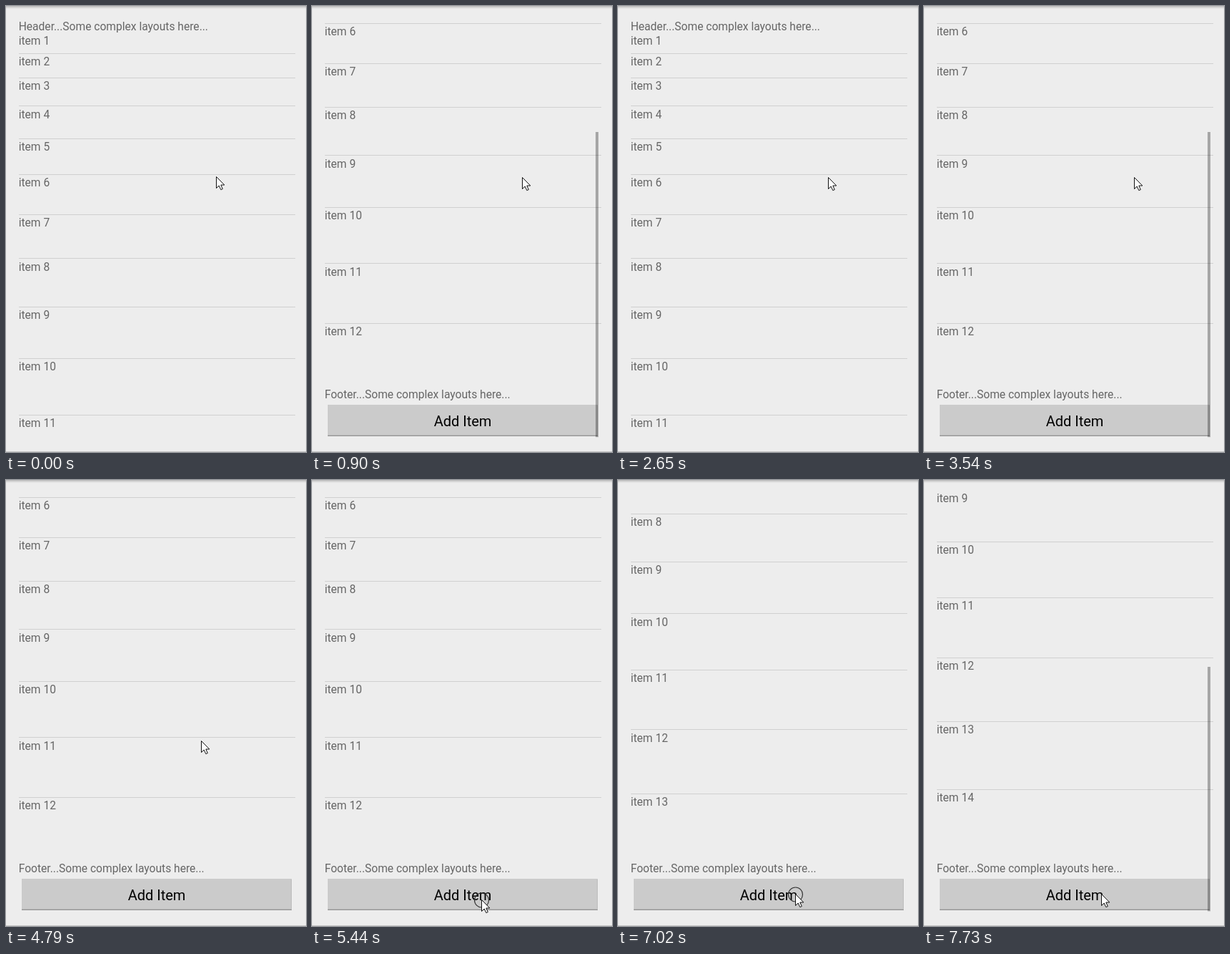
An HTML page with a canvas that plays this animation: 420x623 px, repeating every 8000 ms.

```html
<!DOCTYPE html>
<html lang="en">
<head>
<meta charset="utf-8">
<title>List with header and footer</title>
<style>
  html, body { margin: 0; height: 100%; overflow: hidden; background: #ededed; }
  canvas { display: block; width: 420px; height: 623px; }
</style>
</head>
<body>
<canvas></canvas>
<script>
const W = 420, H = 623, LOOP = 8000;
const TOP = 18, VIEW = 587, END = 532.4;  // list viewport, list end when fully scrolled
const STEP = 130;                         // ms between screen updates
const SCALE = 0.7395;                     // device pixels to stage pixels
const CLICKS = [5440, 7020];

const canvas = document.querySelector('canvas');
const ctx = canvas.getContext('2d');
const dpr = window.devicePixelRatio || 1;
canvas.width = W * dpr;
canvas.height = H * dpr;

// Bottom edge of item k; each item is 7.5 device pixels taller than the one before
function edge(k) {
  if (k < 1) return 37;
  let y = 66.2;
  for (let i = 2; i <= k; i++) y += SCALE * (31 + Math.floor(7.5 * i));
  return y;
}
const maxScroll = count => edge(count) - END;

// Moves: [start, steps, target...], each easing out from where the last one ended
const scrolls = [[0, 1, 0], [500, 4, maxScroll(12)], [1910, 2, 0],
  [3270, 3, maxScroll(12)], [6070, 2, maxScroll(13)], [7730, 1, maxScroll(14)]];
const cursorMoves = [[0, 1, 294, 238], [500, 1, 294, 239], [4790, 5, 237, 586],
  [5800, 1, 249, 559], [6470, 3, 248, 578]];

function follow(moves, t) {
  return moves.filter(m => m[0] <= t).reduce((from, [start, steps, ...to]) => {
    const p = Math.min(1, (Math.floor((t - start) / STEP) + 1) / steps);
    const ease = 1 - (1 - p) ** 2;
    return to.map((v, i) => from[i] + (v - from[i]) * ease);
  }, [0, 0]);
}

// The scroll bar stays 300 ms after a scroll, then fades in two steps
function barAlpha(t) {
  const [start, steps] = scrolls.findLast(m => m[0] <= t);
  if (!start) return 0;
  const idle = t - start - (steps - 1) * STEP - 300;
  return Math.max(0, 1 - Math.max(0, Math.ceil(idle / STEP)) / 2);
}

function rect(x, y, w, h, color) {
  ctx.fillStyle = color;
  ctx.fillRect(x, Math.round(y), w, h);
}

function label(text, x, y, size = 15.6, color = '#666', align = 'left') {
  ctx.font = `${size}px Roboto, sans-serif`;
  ctx.textAlign = align;
  ctx.fillStyle = color;
  ctx.fillText(text, x, Math.round(y));
}

function drawList(scroll, count) {
  label('Header...Some complex layouts here...', 17.7, 34 - scroll);
  for (let k = 1; k <= count; k++) {
    label('item ' + k, 17.7, edge(k - 1) + 17.25 - scroll);
    if (k < count) rect(18, edge(k) - scroll, 387, 1, '#d0d0d0');
  }
  const end = Math.round(edge(count) - scroll);
  label('Footer...Some complex layouts here...', 17.7, end + 16);
  rect(22, end + 25, 378, 44, '#cbcbcb');
  rect(22, end + 67, 378, 1, '#b4b4b4');
  rect(22, end + 68, 378, 1, '#969696');
  rect(399, end + 26, 1, 42, '#bcbcbc');
  label('Add Item', 211, end + 55, 20, '#000', 'center');
}

function drawBar(scroll, count, alpha) {
  const total = maxScroll(count) + VIEW;
  const y = TOP + scroll / total * VIEW + 2.5;
  rect(397, y, 4, VIEW * VIEW / total - 5.5, `rgba(0,0,0,${.3 * alpha})`);
}

function drawRing(x, y) {
  ctx.beginPath();
  ctx.arc(x + .5, y + 1, 10, 0, 2 * Math.PI);
  ctx.lineWidth = 1.2;
  ctx.strokeStyle = '#333';
  ctx.stroke();
}

const arrow = new Path2D('M.5 .5V16.5L4.2 13L6.8 18.6L9.3 17.5L6.8 12H11.8Z');

function drawCursor(x, y) {
  ctx.save();
  ctx.translate(Math.round(x), Math.round(y));
  ctx.fillStyle = '#fff';
  ctx.fill(arrow);
  ctx.lineWidth = 1;
  ctx.strokeStyle = '#111';
  ctx.stroke(arrow);
  ctx.restore();
}

function draw(t) {
  const [scroll] = follow(scrolls, t), [x, y] = follow(cursorMoves, t);
  const count = 12 + CLICKS.filter(c => t >= c + STEP).length;
  ctx.setTransform(dpr, 0, 0, dpr, 0, 0);
  rect(0, 0, W, H, '#ededed');
  for (let i = 0; i < 4; i++) rect(0, i, W, 1, `rgba(0,0,0,${.2 * (1 - i / 4) ** 1.3})`);
  rect(0, 622, W, 1, '#c4c4c4');

  ctx.save();
  ctx.beginPath();
  ctx.rect(0, TOP - .5, W, VIEW + .5);
  ctx.clip();
  drawList(scroll, count);
  drawBar(scroll, count, barAlpha(t));
  ctx.restore();

  if (CLICKS.some(c => t >= c && t < c + STEP)) drawRing(x, y);
  drawCursor(x, y);
}

const start = performance.now();
function tick() {
  draw((performance.now() - start) % LOOP);
  requestAnimationFrame(tick);
}
tick();
</script>
</body>
</html>
```
